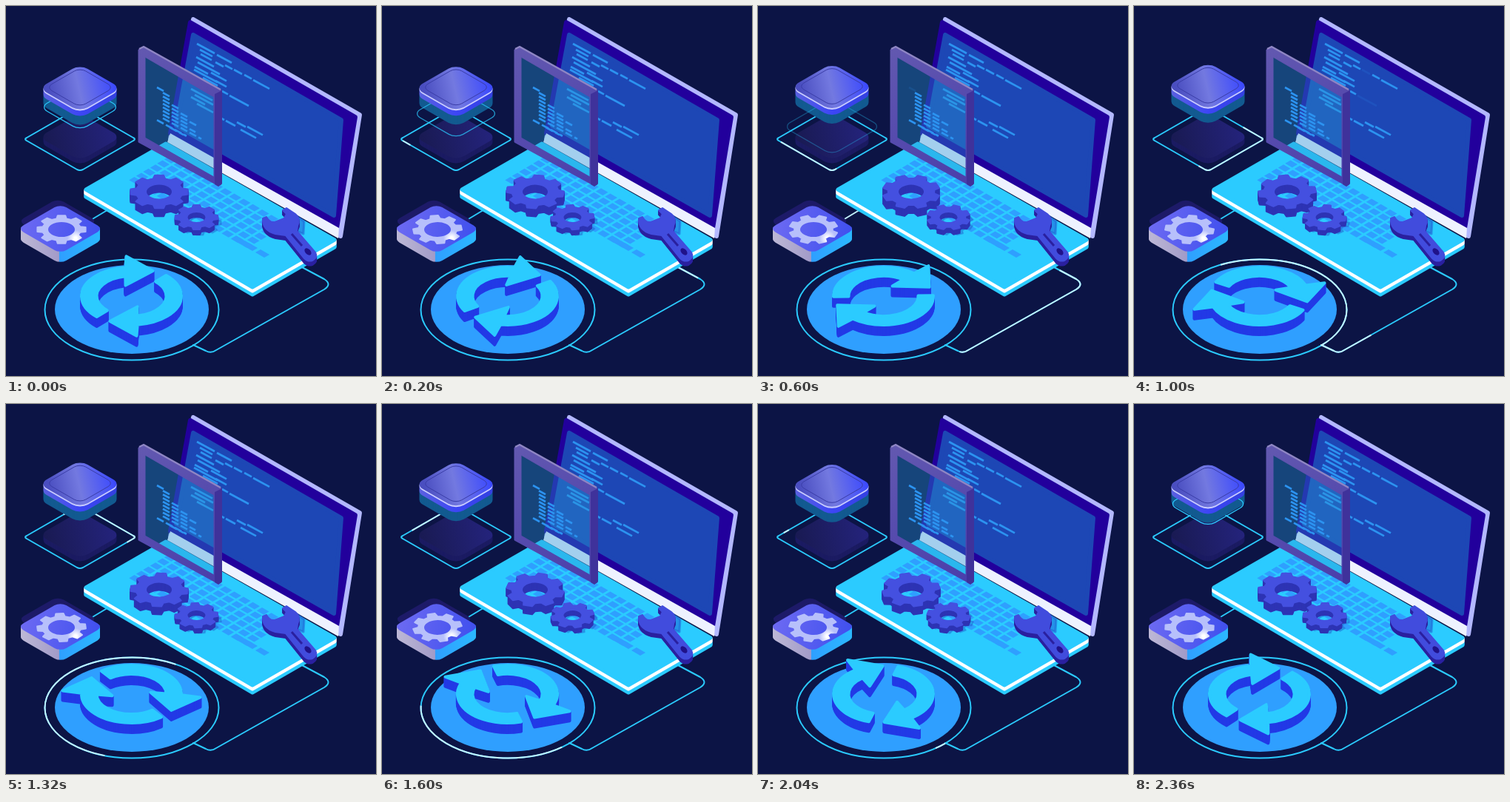
Animation of 500x500 px, one loop 2.4 s. Source, as an HTML page with a canvas:

```html
<!DOCTYPE html>
<html>
<head>
<meta charset="utf-8">
<style>
html, body { margin: 0; width: 100%; height: 100%; overflow: hidden; background: #0c1445; }
canvas { display: block; }
</style>
</head>
<body>
<canvas id="stage" width="500" height="500"></canvas>
<script>
const ctx = document.getElementById('stage').getContext('2d');
const LOOP = 2400, TAU = Math.PI * 2, rad = Math.PI / 180;
const CYAN = '#2bcbff', BLUE = '#2f9fff';

ctx.lineJoin = 'round';

const toPath = p => typeof p === 'string' ? new Path2D(p) : p;
const smooth = u => { u = Math.min(1, Math.max(0, u)); return u * u * (3 - 2 * u); };

function shape(p, fill, round = 0) {
  p = toPath(p);
  ctx.fillStyle = ctx.strokeStyle = fill;
  ctx.fill(p, 'evenodd');
  if (round) { ctx.lineWidth = round; ctx.stroke(p); }
}

function line(p, color, width = 2) {
  ctx.strokeStyle = color;
  ctx.lineWidth = width;
  ctx.stroke(toPath(p));
}

function layers(p, from, to, fill, round) {
  for (let k = from; k >= to; k--) {
    ctx.save();
    ctx.translate(0, k);
    shape(p, fill, round);
    ctx.restore();
  }
}

function solid(p, height, side, top, round) {
  layers(p, height, 1, side, round);
  shape(p, top, round);
}

function gradient(x0, y0, x1, y1, ...stops) {
  const g = ctx.createLinearGradient(x0, y0, x1, y1);
  stops.forEach(([at, color]) => g.addColorStop(at, color));
  return g;
}

function transformed(path, matrix) {
  const out = new Path2D();
  out.addPath(path, new DOMMatrix(matrix));
  return out;
}

// Rounded square lying on the isometric floor
function tile(x, y, half, r) {
  const p = new Path2D();
  p.roundRect(-half, -half, 2 * half, 2 * half, r);
  return transformed(p, [.866, .5, -.866, .5, x, y]);
}

// Shape turned on the floor plane and moved to x, y
function onFloor(path, x, y, angle) {
  const c = Math.cos(angle), s = Math.sin(angle);
  return transformed(path, [c, s * .577, -s, c * .577, x, y]);
}

function gear(outer, root, hole) {
  const p = new Path2D();
  for (let i = 0; i < 8; i++)
    for (const [a, r] of [[-.33, root], [-.2, outer], [.2, outer], [.33, root]]) {
      const t = (i + a) * TAU / 8;
      p.lineTo(r * Math.cos(t), r * Math.sin(t));
    }
  p.closePath();
  p.moveTo(hole, 0);
  p.arc(0, 0, hole, 0, TAU);
  return p;
}

const bigGear = gear(39, 31.5, 18), smallGear = gear(29, 23, 13), paleGear = gear(33, 26, 19);

const arrow = new Path2D();
arrow.arc(0, 0, 67.5, 134 * rad, 263 * rad);
arrow.lineTo(-7, -93);
arrow.lineTo(29, -59);
arrow.lineTo(-8, -25);
arrow.arc(0, 0, 47, 260 * rad, 134 * rad, true);
arrow.closePath();

const cable = new Path2D('M400 353L430 369Q441 376 430 383L284 465Q277 470 270 466L253 458');
cable.ellipse(170, 410.5, 117.5, 68, 0, 45 * rad, -315 * rad, true);
const border = new Path2D('M28 182L96 221Q100 223 104 221L172 182Q176 180 172 178L104 139Q100 137 96 139L28 178Q24 180 28 182Z');

// Bright run that travels along a line
function glowLine(path, length, t) {
  line(path, CYAN);
  const head = smooth(t / 1750) * length, tail = smooth((t - 500) / 1700) * length;
  if (head - tail < 1) return;
  ctx.setLineDash([head - tail, 9999]);
  ctx.lineDashOffset = -tail;
  line(path, '#c4f2ff');
  ctx.setLineDash([]);
}

// x, y, width and optional time at which the line fades out
const screenCode = [
  [258, 51, 24], [285, 66, 20], [262, 59, 17], [263, 65, 15], [257, 69, 24], [283, 76, 11],
  [259, 76, 30], [255, 82, 18], [277, 90, 21], [254, 86, 32], [266, 97, 20], [283, 101, 15],
  [296, 80, 10], [308, 86, 11, 1000], [322, 93, 10], [334, 100, 22],
  [250, 112, 29], [255, 120, 25], [250, 123, 19], [258, 132, 22],
  [292, 115, 8], [302, 121, 26, 1000],
  [284, 148, 11], [297, 155, 13], [312, 157, 12], [326, 163, 21], [317, 167, 21, 400]
];
const tabletCode = [[204, 9, 600], [212, 10], [212, 9], [212, 22], [212, 34], [212, 48], [212, 36], [212, 44], [212, 52], [204, 40, 400], [222, 18]];

function codeLine(x, y, width, fadeAt, t) {
  ctx.globalAlpha = fadeAt ? Math.min(1, .15 + Math.abs(t - fadeAt) / 220) : 1;
  line(`M${x} ${y}l${width} ${width * .54}`, '#2c93f0', 2.7);
  ctx.globalAlpha = 1;
}

function laptop(t) {
  shape('M253 18L478 147L452 311L222 180Z', '#b3b8ff', 6);
  shape('M249 22L472 150L447 300L222 172Z', '#22009c', 6);
  shape('M253 39L453 154L443 283L230 162Z', '#1d47b5', 6);
  screenCode.forEach(([x, y, w, at]) => codeLine(x, y, w, at, t));
  shape('M222 172L450 300L449 314L218 184Z', '#eef2ff');

  const base = new Path2D('M108 248L216 186L444 316L333 380Z');
  layers(base, 10, 6, CYAN, 5);
  layers(base, 5, 1, '#fff', 5);
  shape(base, CYAN, 5);
  for (let row = 0; row < 6; row++)
    for (let i = 0; i < 13; i++)
      shape(`M${221 + i * 12.5 - row * 9.5} ${203 + i * 7.2 + row * 5.6}l9.5 5.5l-7.2 4.2l-9.5 -5.5z`, BLUE);
  for (let i = 0; i < 3; i++) shape(`M${312 + i * 16} ${311 + i * 9}l12 7l-7 4l-12 -7z`, BLUE);
}

function tablet(t) {
  shape('M188 69V178L281 231V123Z', 'rgba(40,150,210,.38)');
  tabletCode.forEach(([x, w, at], i) => {
    const y = 110 + i * 4.9 - (x - 204) * -.3;
    for (let d = 0; d < w; d += 12) codeLine(x + d, y + d * .54, Math.min(9, w - d), at, t);
  });
  shape('M179 59L186 55L291 114V241L287 243L179 184ZM188 69V178L281 231V123Z',
    gradient(180, 60, 285, 240, [0, '#6258b0'], [1, '#4a3eab']), 1);
  shape('M282 119L292 114V240L287 244L282 241Z', '#3f329b');
  line('M180 58L186 55L290 113', '#8f86c4', 2.5);
}

function tools(turn) {
  shape(onFloor(smallGear, 262, 293, -turn), 'rgba(30,90,200,.35)', 2);
  solid(onFloor(bigGear, 207, 251, turn), 11, '#2d33b4', '#4450e0', 2);
  solid(onFloor(smallGear, 257.5, 285.5, -turn), 7, '#2d33b4', '#4450e0', 2);

  shape('M388 280L403 291L402 308L392 304Z', 'rgba(30,90,210,.5)', 3);
  const wrench = 'M347 287L352 285Q356 293 363 292L376 287L379 281L374 276L379 273L391 281Q399 288 394 297L393 304L418 333Q422 340 414 344Q408 346 403 341L378 310L364 308Q346 303 347 287Z';
  solid(wrench, 6, '#2a209f', '#414cdd', 2);
  line('M386 308L400 324', '#2a209f', 3);
  ctx.beginPath();
  ctx.ellipse(408, 332, 5.5, 3.5, .8, 0, TAU);
  ctx.fillStyle = '#20128a';
  ctx.fill();
}

function gearTile(turn) {
  shape(tile(70, 291, 31, 9), '#1d1a68');
  const sides = gradient(20, 0, 127, 0, [0, '#bdb8d6'], [.48, '#a29bc8'], [.49, BLUE], [1, '#2bb8ff']);
  solid(tile(73.5, 301, 33.5, 9), 14, sides, gradient(25, 290, 125, 312, [0, '#6b69f2'], [1, '#4050ee']));
  const pale = ctx.createRadialGradient(94, 314, 2, 94, 314, 11);
  pale.addColorStop(0, '#fff');
  pale.addColorStop(1, '#b7c0fb');
  shape(onFloor(paleGear, 75, 302, -turn), pale, 2);
}

function syncArrows(t) {
  ctx.beginPath();
  ctx.ellipse(170, 410, 104, 60, 0, 0, TAU);
  ctx.fillStyle = BLUE;
  ctx.fill();
  const angle = Math.PI * t / LOOP, pair = new Path2D();
  for (const a of [angle, angle + Math.PI]) pair.addPath(onFloor(arrow, 169.5, 392, a));
  solid(pair, 13, '#2239e6', CYAN, 4);
}

function chipStack(t) {
  glowLine(border, 328, t);
  const dark = gradient(52, 190, 148, 170, [0, '#191a52'], [1, '#24237c']);
  solid(tile(100, 177, 32, 12), 7, '#1b1b62', dark);

  const lift = -1.5 * (1 - Math.cos(TAU * t / LOOP));
  ctx.save();
  ctx.translate(0, lift);
  layers(tile(100, 120, 32, 12), 12, 1, '#125a90');
  ctx.restore();

  const p = ((t + 200) % LOOP) / 1100;
  if (p < 1) {
    ctx.globalAlpha = Math.min(1, 1.15 * (1 - p));
    line(tile(100, 128 + 48 * p, (45 + 20 * p) * .64, 11), CYAN, 1.3);
    ctx.globalAlpha = 1;
  }

  ctx.translate(0, lift);
  const side = gradient(51, 0, 150, 0, [0, '#5a60e0'], [.5, '#3c46f5'], [1, '#3340e0']);
  layers(tile(100, 112, 32, 12), 8, 1, side);
  layers(tile(100, 111, 32, 12), 2, 1, '#c9ccff');
  shape(tile(100, 111, 32, 12), gradient(60, 125, 148, 105, [0, '#4a4ec0'], [.45, '#7379e0'], [1, '#3a48ff']));
  line(tile(100, 110, 26.5, 9), '#3a3da8', 1);
  ctx.translate(0, -lift);
}

function draw(now) {
  const t = Math.floor(now % LOOP / 40) * 40, turn = Math.PI / 2 * t / LOOP;
  ctx.fillStyle = '#0c1445';
  ctx.fillRect(0, 0, 500, 500);
  glowLine(cable, 853, t);
  line('M105 295L140 274', t > 250 && t < 800 ? '#c4f2ff' : CYAN);
  laptop(t);
  tablet(t);
  tools(turn);
  gearTile(turn);
  syncArrows(t);
  chipStack(t);
}

const start = performance.now();
(function tick() {
  draw(performance.now() - start);
  requestAnimationFrame(tick);
})();
</script>
</body>
</html>
```
